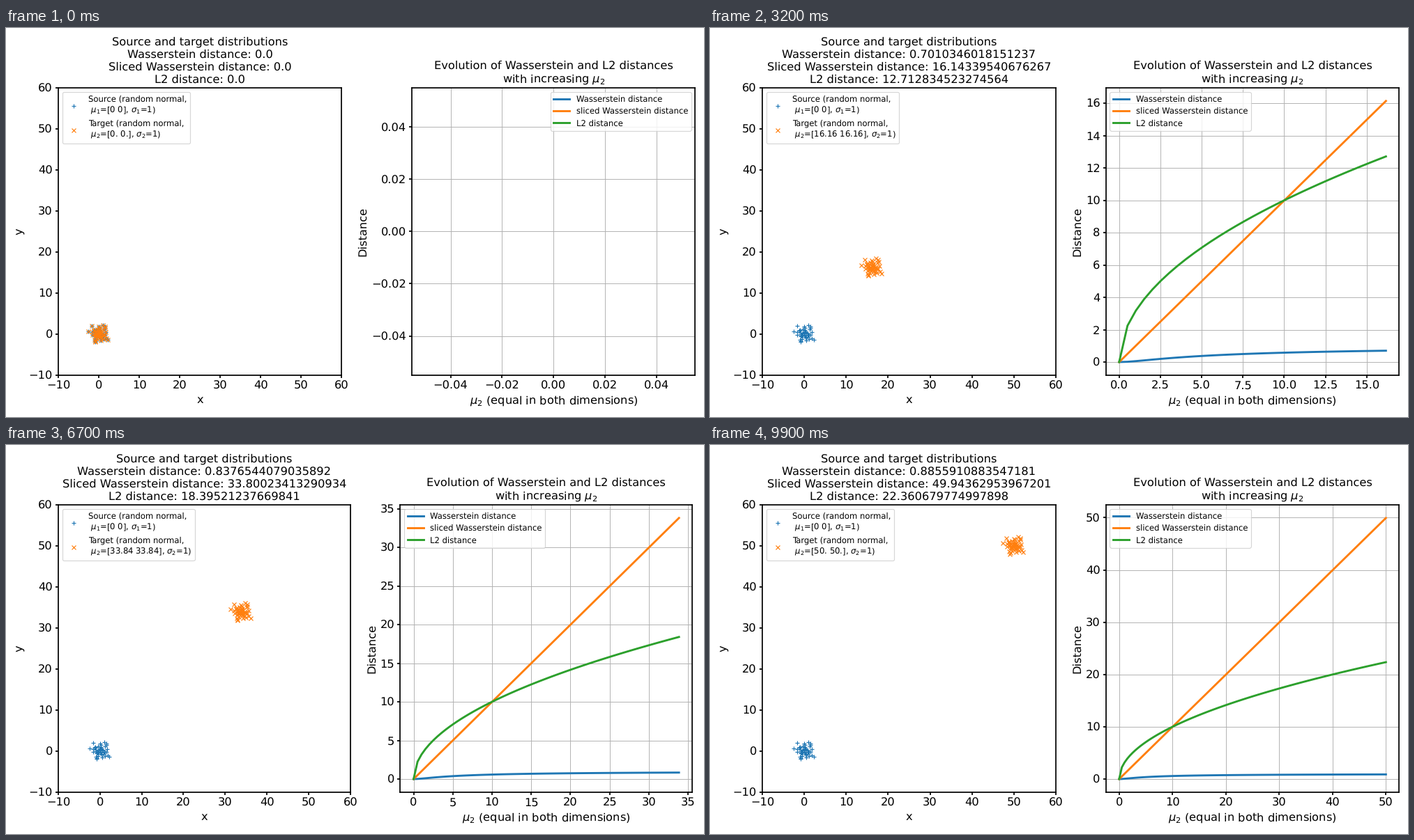
A matplotlib script that plays this animation: 1001 by 559 pixels, repeating every 10 s.

```python
import numpy as np
import matplotlib.pyplot as plt
from matplotlib.animation import FuncAnimation

WIDTH, HEIGHT = 1001, 559
DPI = WIDTH / 12
FRAMES, INTERVAL = 100, 100
BIG, SMALL = 14, 10
N = 50
SLICED_END = 49.94362953967201   # sliced distance at the largest shift

plt.rcParams.update({
    "font.family": "DejaVu Sans",
    "axes.linewidth": 1.5,
    "text.hinting": "no_hinting",   # line heights stay unrounded
})

points = np.random.RandomState(0).randn(N, 2)
shifts = np.linspace(0, 50, FRAMES)


def transport_cost(mu):
    """Optimal transport cost with the cost matrix scaled to a maximum of 1."""
    cost = ((points[:, None] - (points + mu)[None]) ** 2).sum(axis=2)
    cost /= cost.max()
    return np.sum(np.eye(N) / N * cost)


wasserstein = np.array([transport_cost(mu) for mu in shifts])
sliced = shifts * SLICED_END / 50
l2 = np.sqrt(10 * shifts)

fig, (left, right) = plt.subplots(
    1, 2, figsize=((WIDTH + 1e-6) / DPI, (HEIGHT + 1e-6) / DPI), dpi=DPI)
fig.patch.set_facecolor("white")
for ax in (left, right):
    ax.tick_params(labelsize=BIG, width=1.5)

# Left panel: the two point clouds
left.plot(*points.T, "+", color="C0",
          label="Source (random normal,\n $\\mu_1$=[0 0], $\\sigma_1$=1)")
cloud, = left.plot(*points.T, "x", color="C1")
left.set(xlim=(-10, 60), ylim=(-10, 60))
left.set_xlabel("x", fontsize=BIG)
left.set_ylabel("y", fontsize=BIG)

# Right panel: growing distance curves
right.grid(True)
curves = [(right.plot([], [], lw=2.5, label=name)[0], values)
          for name, values in (("Wasserstein distance", wasserstein),
                               ("sliced Wasserstein distance", sliced),
                               ("L2 distance", l2))]
right.set_xlabel(r"$\mu_2$ (equal in both dimensions)", fontsize=BIG)
right.set_ylabel("Distance", fontsize=BIG)
right.set_title("Evolution of Wasserstein and L2 distances\n"
                r"with increasing $\mu_2$", fontsize=BIG)


def update(k):
    mu = shifts[k]
    cloud.set_data(*(points + mu).T)
    center = np.round(np.array([mu, mu]), 2)
    cloud.set_label("Target (random normal,\n"
                    f" $\\mu_2$={center}, $\\sigma_2$=1)")
    left.legend(loc="upper left", fontsize=SMALL)
    left.set_title("Source and target distributions\n"
                   f"Wasserstein distance: {wasserstein[k]}\n"
                   f"Sliced Wasserstein distance: {sliced[k]}\n"
                   f"L2 distance: {l2[k]}", fontsize=BIG, linespacing=1.22)

    for line, values in curves:
        line.set_data(shifts[:k + 1], values[:k + 1])
    right.relim()
    right.autoscale_view()
    right.legend(loc="upper left" if k else "upper right", fontsize=SMALL)

    # Fixed starting layout, so the fitted one depends on k alone
    fig.subplots_adjust(left=0.075, right=0.987, bottom=0.107, top=0.845,
                        wspace=0.16)
    fig.tight_layout()
    return []


anim = FuncAnimation(fig, update, frames=FRAMES, interval=INTERVAL,
                     repeat=True, repeat_delay=0, blit=False)
plt.show()
```
